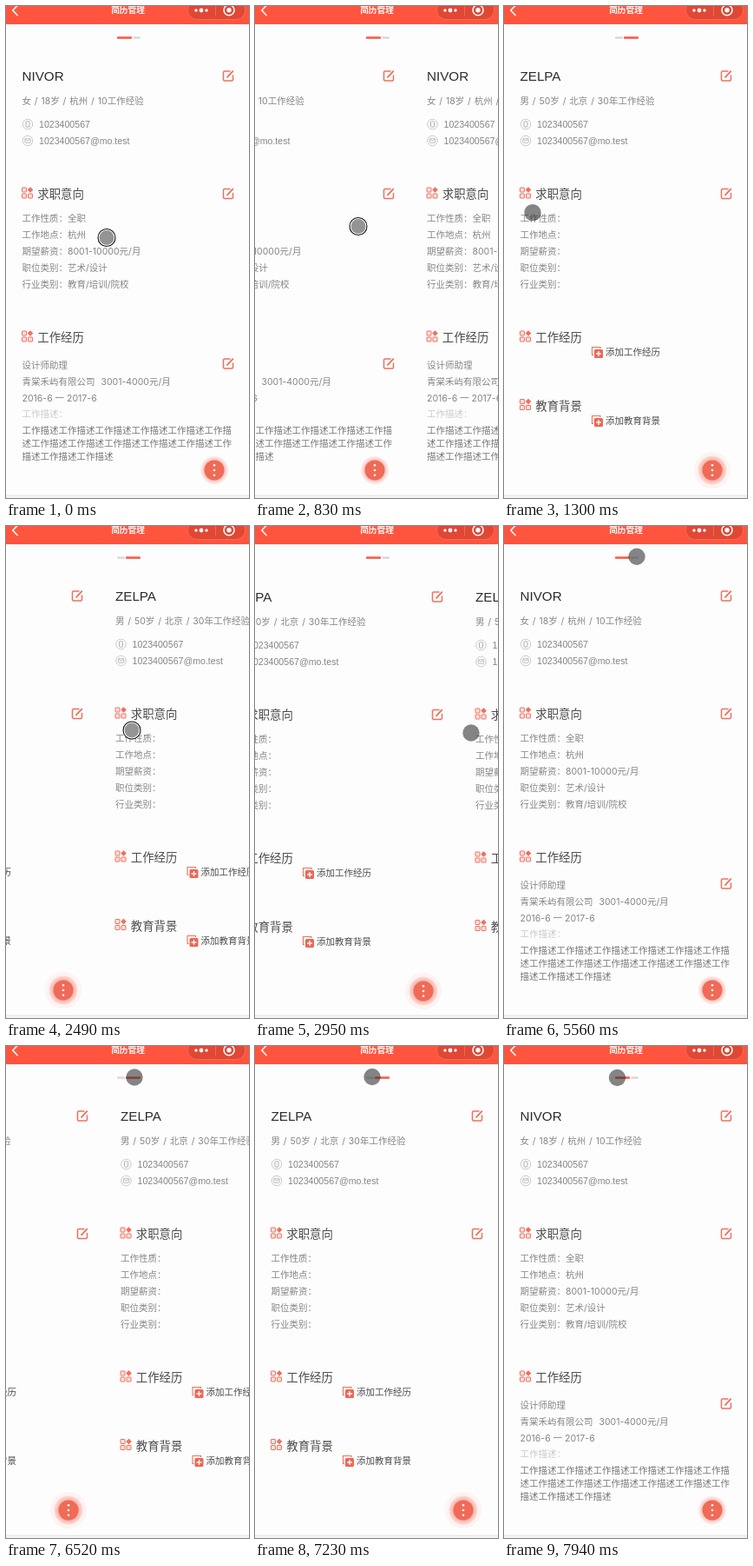
Recreate the animation shown at these times as an HTML page with a canvas. Size 280x566 px, loop 8000 ms.

```html
<!DOCTYPE html>
<html lang="zh-CN">
<head>
<meta charset="utf-8">
<title>简历管理</title>
<style>
html, body { margin: 0; width: 100%; height: 100%; overflow: hidden; background: #fdfdfd; }
canvas { display: block; width: 280px; height: 566px; }
</style>
</head>
<body>
<canvas id="stage" width="280" height="566"></canvas>
<script>
const ctx = document.getElementById('stage').getContext('2d');
const LOOP = 8000, STEP = 118.3, PAGE = 281.5;
const RED = '#ff553f', CORAL = '#f1705f', GREY = '#858585', DARK = '#4a4a4a';
const CJK = "Inter, 'Noto Sans CJK SC', 'Noto Sans CJK', sans-serif";
const LATIN = "'Liberation Sans', Arial, sans-serif";

const people = {
  first: {
    name: 'NIVOR', about: '女 / 18岁 / 杭州 / 10工作经验',
    wishes: ['全职', '杭州', '8001-10000元/月', '艺术/设计', '教育/培训/院校']
  },
  second: {
    name: 'ZELPA', about: '男 / 50岁 / 北京 / 30年工作经验',
    wishes: ['', '', '', '', '']
  }
};
const PHONE = '1023400567';
const EMAIL = PHONE + '@mo.test';
const LABELS = ['工作性质', '工作地点', '期望薪资', '职位类别', '行业类别'];
const DUTIES = '工作描述'.repeat(14);

// Each key: step, x, y
const pointerKeys = [
  [0, 116, 266.5], [2, 217, 270], [4, 217, 270], [5, 205, 269], [9, 33, 238], [12, 33, 237.5],
  [16, 21, 235], [17, 21, 235], [21, 145, 235], [23, 232, 237], [24, 249, 238], [27, 249, 238],
  [31, 146, 44], [36, 148, 35.5], [40, 148, 35.5], [41, 149.5, 34.5], [42, 149.5, 34.5],
  [43, 150, 34], [44, 150, 34], [46, 158, 34.5], [48, 148, 36], [57, 148, 36],
  [61, 135, 35.5], [66, 135, 36.5], [67, 130.5, 36.5]
];
// Each key: step, horizontal scroll
const scrollKeys = [
  [4, 0], [5, 6], [8, 150], [9, 225], [10, 268], [11, PAGE], [17, PAGE], [18, 267], [21, 174],
  [23, 86], [24, 69], [25, 46], [26, 14], [27, 3], [28, 0], [50, 0], [51, 3], [52, 18], [53, 48],
  [54, 100], [55, 168], [56, 255], [57, PAGE], [62, PAGE], [63, 225], [64, 60], [65, 0]
];

const within = (k, from, to) => k >= from && k < to;

function track(keys, k) {
  const i = keys.findIndex(key => key[0] > k);
  if (i === 0) return keys[0].slice(1);
  if (i < 0) return keys[keys.length - 1].slice(1);
  const a = keys[i - 1], b = keys[i], u = (k - a[0]) / (b[0] - a[0]);
  return a.slice(1).map((v, j) => v + (b[j + 1] - v) * u);
}

function text(str, x, y, { size = 10.5, color = GREY, font = CJK, weight = 400, align = 'left', words = 0 } = {}) {
  ctx.font = `${weight} ${size}px ${font}`;
  ctx.fillStyle = color;
  ctx.textAlign = align;
  ctx.wordSpacing = words + 'px';
  ctx.fillText(str, x, y + size * 0.37);
}

function disc(x, y, r, fill) {
  ctx.beginPath();
  ctx.arc(x, y, r, 0, 7);
  ctx.fillStyle = fill;
  ctx.fill();
}

function ring(x, y, r, color, width) {
  ctx.beginPath();
  ctx.arc(x, y, r, 0, 7);
  ctx.strokeStyle = color;
  ctx.lineWidth = width;
  ctx.stroke();
}

function box(x, y, w, h, r, fill, stroke, width = 1) {
  ctx.beginPath();
  ctx.roundRect(x, y, w, h, r);
  if (fill) { ctx.fillStyle = fill; ctx.fill(); }
  if (stroke) { ctx.strokeStyle = stroke; ctx.lineWidth = width; ctx.stroke(); }
}

function line(color, width, ...points) {
  ctx.beginPath();
  points.forEach(p => ctx.lineTo(...p));
  ctx.strokeStyle = color;
  ctx.lineWidth = width;
  ctx.stroke();
}

function editIcon(y) {
  ctx.lineCap = 'round';
  line(CORAL, 1.5, [258, y - 5], [251.5, y - 5], [250.5, y - 4], [250.5, y + 5], [251.5, y + 6],
    [260.5, y + 6], [261.5, y + 5], [261.5, y]);
  line(CORAL, 1.9, [255, y + 1.8], [261.3, y - 4.8]);
  ctx.lineCap = 'butt';
}

function heading(label, y) {
  [[18.5, y - 7], [18.5, y], [25.5, y]].forEach(([x, top]) => box(x, top, 5, 5, 0.5, '#fde0dc', CORAL));
  ctx.save();
  ctx.translate(28, y - 4.5);
  ctx.rotate(Math.PI / 4);
  box(-2.4, -2.4, 4.8, 4.8, 0.5, CORAL);
  ctx.restore();
  text(label, 36.3, y + 0.5, { size: 13.4, color: DARK });
}

function addButton(label, y) {
  line(CORAL, 1.1, [103, y + 3.5], [101.5, y + 3.5], [101.5, y - 5.5], [111, y - 5.5], [111, y - 4]);
  box(104, y - 3, 10, 10, 1.5, '#ee6655');
  line('#fff', 1.4, [106, y + 2], [112, y + 2]);
  line('#fff', 1.4, [109, y - 1], [109, y + 5]);
  text(label, 117, y + 0.5, { color: DARK });
}

function contact() {
  ring(25, 136, 5.8, '#c4c4c4', 0.9);
  box(23, 132.8, 4, 6.4, 0.8, null, '#a8a8a8', 0.9);
  ring(25, 155, 5.8, '#c4c4c4', 0.9);
  box(21.8, 152.7, 6.4, 4.6, 0.5, null, '#b0b0b0', 0.8);
  line('#b0b0b0', 0.8, [22, 153], [25, 155.4], [28, 153]);
  const style = { size: 10.6, font: LATIN };
  text(PHONE, 38, 136, style);
  text(EMAIL, 38, 154.8, style);
}

function workHistory() {
  editIcon(411);
  text('设计师助理', 18.5, 413.3);
  text('青棠禾屿有限公司', 18.5, 432.3);
  text('3001-4000元/月', 109.5, 432.3);
  text('2016-6 一 2017-6', 18.5, 450.8);
  text('工作描述：', 18.5, 469.5, { color: '#cbcbcb' });
  for (let i = 0; i < 3; i++)
    text(DUTIES.slice(i * 23, i * 23 + 23), 18.5, 488.5 + i * 15, { color: '#777' });
}

function menuButton(wide) {
  if (wide) {
    disc(240, 534, 21, '#fdf3f2');
    disc(240, 534, 16.5, '#fbe3df');
  }
  const glow = ctx.createRadialGradient(240, 534, 10, 240, 534, 17);
  glow.addColorStop(0, 'rgba(241,100,80,.5)');
  glow.addColorStop(1, 'rgba(241,100,80,0)');
  disc(240, 534, 17, glow);
  disc(240, 534, 11.5, '#f06a58');
  [528.3, 534, 539.7].forEach(y => disc(240, y, 1.3, '#fff'));
}

function page(x, y, second) {
  const person = second ? people.second : people.first;
  ctx.save();
  ctx.translate(x, y);
  text(person.name, 18.5, 80.3, { size: 15.2, color: '#2c2c2c', font: LATIN });
  editIcon(80);
  text(person.about, 18.5, 109.5, { words: 0.9 });
  contact();
  heading('求职意向', 216);
  editIcon(215.5);
  LABELS.forEach((label, i) => {
    const rowY = 244.5 + i * 18.8;
    text(label + '：', 18.5, rowY);
    text(person.wishes[i], 71, rowY);
  });
  heading('工作经历', 381);
  if (second) {
    addButton('添加工作经历', 398);
    heading('教育背景', 459.5);
    addButton('添加教育背景', 477);
  } else {
    workHistory();
  }
  menuButton(second);
  ctx.restore();
}

function pager(second) {
  box(128, 35.3, second ? 9 : 17, 2.4, 0.8, second ? '#d9d9d9' : RED);
  box(second ? 138 : 146.5, 35.3, second ? 17 : 8.5, 2.4, 0.8, second ? RED : '#d9d9d9');
}

function header() {
  ctx.fillStyle = RED;
  ctx.fillRect(0, 0, 280, 21);
  line('#fff', 1.6, [13.5, -1], [7.8, 5], [13.5, 11]);
  text('简历管理', 140.5, 4, { size: 9.7, color: '#fff', weight: 700, align: 'center' });
  box(209.5, -6, 66, 21.5, 10.7, 'rgba(100,20,10,.2)', 'rgba(255,190,180,.35)', 0.7);
  disc(219, 5, 1.7, '#fff');
  disc(225, 5, 2.4, '#fff');
  disc(231, 5, 1.7, '#fff');
  line('rgba(255,200,190,.4)', 0.7, [241.5, -2], [241.5, 11]);
  ring(257, 4.8, 6, '#fff', 1.6);
  disc(257, 4.8, 2.7, '#fff');
}

function bottomEdge() {
  ctx.fillStyle = '#e9e9e9';
  ctx.fillRect(0, 562.5, 280, 1.5);
  ctx.fillStyle = '#f4f4f4';
  ctx.fillRect(0, 564, 280, 2);
}

function pointer(x, y, pressed) {
  if (!pressed) return disc(x, y, 9.7, 'rgba(45,45,45,.58)');
  disc(x, y, 10.4, '#fff');
  disc(x, y, 8.4, '#949494');
  ring(x, y, 10, '#111', 1.1);
}

function draw(now) {
  const k = Math.floor((now % LOOP + 10) / STEP);
  const [scroll] = track(scrollKeys, k);
  const [px, py] = track(pointerKeys, k);
  const second = within(k, 10, 28) || within(k, 54, 65);
  const secondDot = within(k, 9, 24) || within(k, 53, 64);
  const pressed = k === 0 || within(k, 5, 9) || within(k, 18, 24);
  const bounce = within(k, 24, 27) ? 1 : 0;

  ctx.fillStyle = '#fdfdfd';
  ctx.fillRect(0, 0, 280, 566);
  page(-scroll, bounce, second);
  if (scroll > 0) page(PAGE - scroll, bounce, second);
  bottomEdge();
  pager(secondDot);
  header();
  pointer(px, py, pressed);
}

const start = performance.now();
function tick() {
  draw(performance.now() - start);
  requestAnimationFrame(tick);
}
tick();
</script>
</body>
</html>
```
